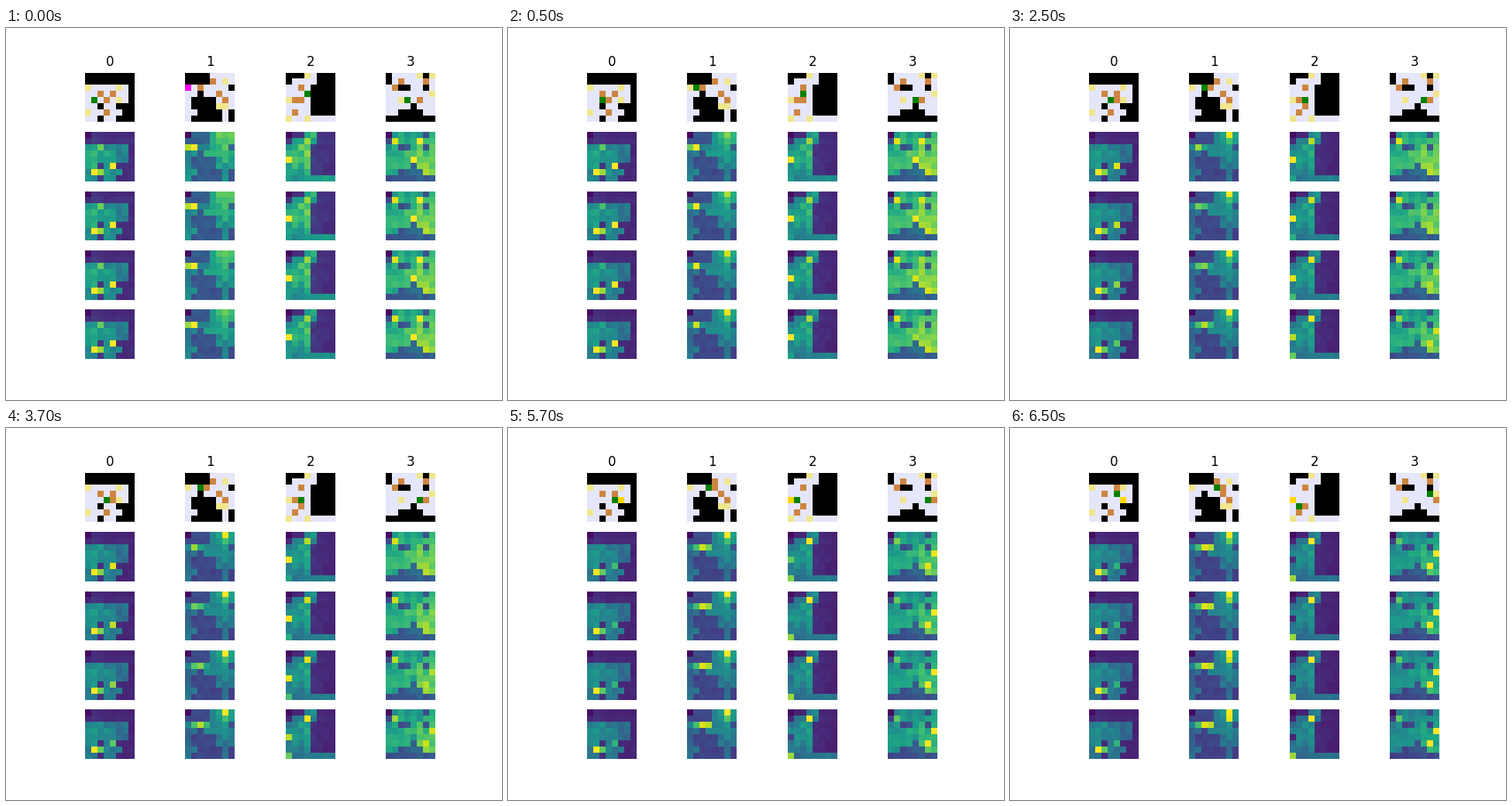
Animation of 640 by 480 pixels, one loop 8000 ms. Source, as a matplotlib script:

```python
import numpy as np
import matplotlib.pyplot as plt
from matplotlib.animation import FuncAnimation
from matplotlib.colors import to_rgb

SIZE = 8
TICKS = 4    # heat maps shown per move
STEPS = {"U": (-1, 0), "D": (1, 0), "L": (0, -1), "R": (0, 1)}
ROWS, COLS = np.indices((SIZE, SIZE))

# walls: (row, col, height, width); other places are (row, col) cells
# floor: heat of open cells early, midway and late; shade: wall heat / floor heat
# warm: centre of the warmer area; glows: cell -> (from, to, tick of the change)
LEVELS = [
    dict(walls=[(0, 0, 2, 8), (2, 7, 6, 1), (5, 2, 1, 1), (5, 5, 1, 2),
                (6, 6, 1, 1), (7, 2, 1, 1), (7, 5, 1, 2)],
         targets=[(2, 0), (2, 5), (4, 5), (6, 0)],
         boxes=[(3, 2), (3, 4), (4, 3), (6, 3)],
         agent=(4, 1), moves="RRRU",
         floor=(.42, .36, .32), shade=.3, warm=(4, 1),
         glows={(6, 1): (1, 1, 9), (6, 2): (.85, .75, 9),
                (5, 4): (1, .65, 10), (2, 2): (.78, .5, 6)}),
    dict(walls=[(0, 0, 2, 4), (2, 7, 1, 1), (3, 2, 1, 1), (4, 1, 2, 4),
                (6, 2, 2, 4), (7, 1, 1, 1), (6, 7, 2, 1)],
         targets=[(1, 6), (2, 0), (5, 5), (5, 6)],
         boxes=[(1, 4), (2, 2), (3, 5), (4, 6)],
         agent=(2, 0), moves="RRRR",
         floor=(.5, .38, .34), shade=.55, warm=(1, 6),
         glows={(2, 0): (.9, .45, 5), (2, 1): (1, .7, 8),
                (2, 2): (.45, .95, 9), (2, 3): (.45, .9, 11),
                (0, 6): (.75, 1, 5), (1, 6): (.7, 1, 17)}),
    dict(walls=[(0, 0, 1, 3), (1, 0, 1, 1), (0, 5, 2, 3), (2, 4, 5, 4)],
         targets=[(0, 3), (4, 0), (7, 0), (7, 3)],
         boxes=[(2, 2), (4, 1), (4, 2), (6, 1)],
         agent=(3, 3), moves="LDLD",
         floor=(.5, .4, .33), shade=.25, warm=(3, 3),
         glows={(1, 3): (.85, 1, 9), (4, 0): (1, .1, 13),
                (7, 0): (.55, .85, 10)}),
    dict(walls=[(0, 0, 2, 1), (0, 6, 1, 1), (2, 2, 1, 2), (2, 6, 1, 1),
                (5, 4, 1, 1), (6, 2, 1, 4), (7, 0, 1, 8)],
         targets=[(0, 5), (0, 7), (3, 7), (4, 2)],
         boxes=[(1, 2), (1, 6), (2, 1), (4, 5)],
         agent=(4, 3), moves="RRRU",
         floor=(.56, .6, .43), shade=.4, warm=(5, 5),
         glows={(1, 1): (.95, .75, 11), (1, 5): (1, .5, 7),
                (3, 7): (.75, 1, 10), (5, 6): (.85, 1, 11),
                (4, 4): (1, .5, 8)}),
]


def play(level, moves):
    """Return agent and boxes after the moves, pushing any box in the way."""
    agent, boxes = level["agent"], set(level["boxes"])
    for move in moves:
        dr, dc = STEPS[move]
        agent = agent[0] + dr, agent[1] + dc
        if agent in boxes:
            boxes.remove(agent)
            boxes.add((agent[0] + dr, agent[1] + dc))
    return agent, boxes


def wall_mask(level):
    mask = np.zeros((SIZE, SIZE), bool)
    for r, c, h, w in level["walls"]:
        mask[r:r + h, c:c + w] = True
    return mask


def board(level, turn):
    agent, boxes = play(level, level["moves"][:turn])
    targets = level["targets"]
    image = np.full((SIZE, SIZE, 3), to_rgb("lavender"))
    image[wall_mask(level)] = 0
    for cell in targets:
        image[cell] = to_rgb("khaki")
    for cell in boxes:
        image[cell] = to_rgb("gold" if cell in targets else "peru")
    image[agent] = to_rgb("magenta" if agent in targets else "green")
    return image


def heat_map(level, tick):
    row, col = level["warm"]
    warmth = np.exp(-((ROWS - row) ** 2 + (COLS - col) ** 2) / 12)
    heat = np.interp(tick, (0, 6, 19), level["floor"]) * (1 + .5 * warmth)
    heat[wall_mask(level)] *= level["shade"]
    heat *= 1 + np.random.default_rng(row + col).uniform(-.15, .15, heat.shape)
    for cell, (start, end, middle) in level["glows"].items():
        heat[cell] = start + (end - start) / (1 + np.exp(middle - tick))
    heat[0, 0] = .03
    return heat


fig, axes = plt.subplots(1 + TICKS, len(LEVELS), figsize=(6.4, 4.8), dpi=100)
for ax in axes.flat:
    ax.axis("off")

boards, maps = [], []
for col, level in enumerate(LEVELS):
    axes[0, col].set_title(str(col))
    boards.append(axes[0, col].imshow(board(level, 0)))
    maps.append([axes[1 + k, col].imshow(heat_map(level, k), vmin=0, vmax=1)
                 for k in range(TICKS)])


def update(frame):
    turn = (frame + 3) // 4     # the opening position is held only briefly
    for level, picture, column in zip(LEVELS, boards, maps):
        picture.set_data(board(level, turn))
        for k, image in enumerate(column):
            image.set_data(heat_map(level, turn * TICKS + k))
    return boards + sum(maps, [])


animation = FuncAnimation(fig, update, frames=16, interval=500,
                          repeat=True, repeat_delay=0, blit=False)
plt.show()
```
